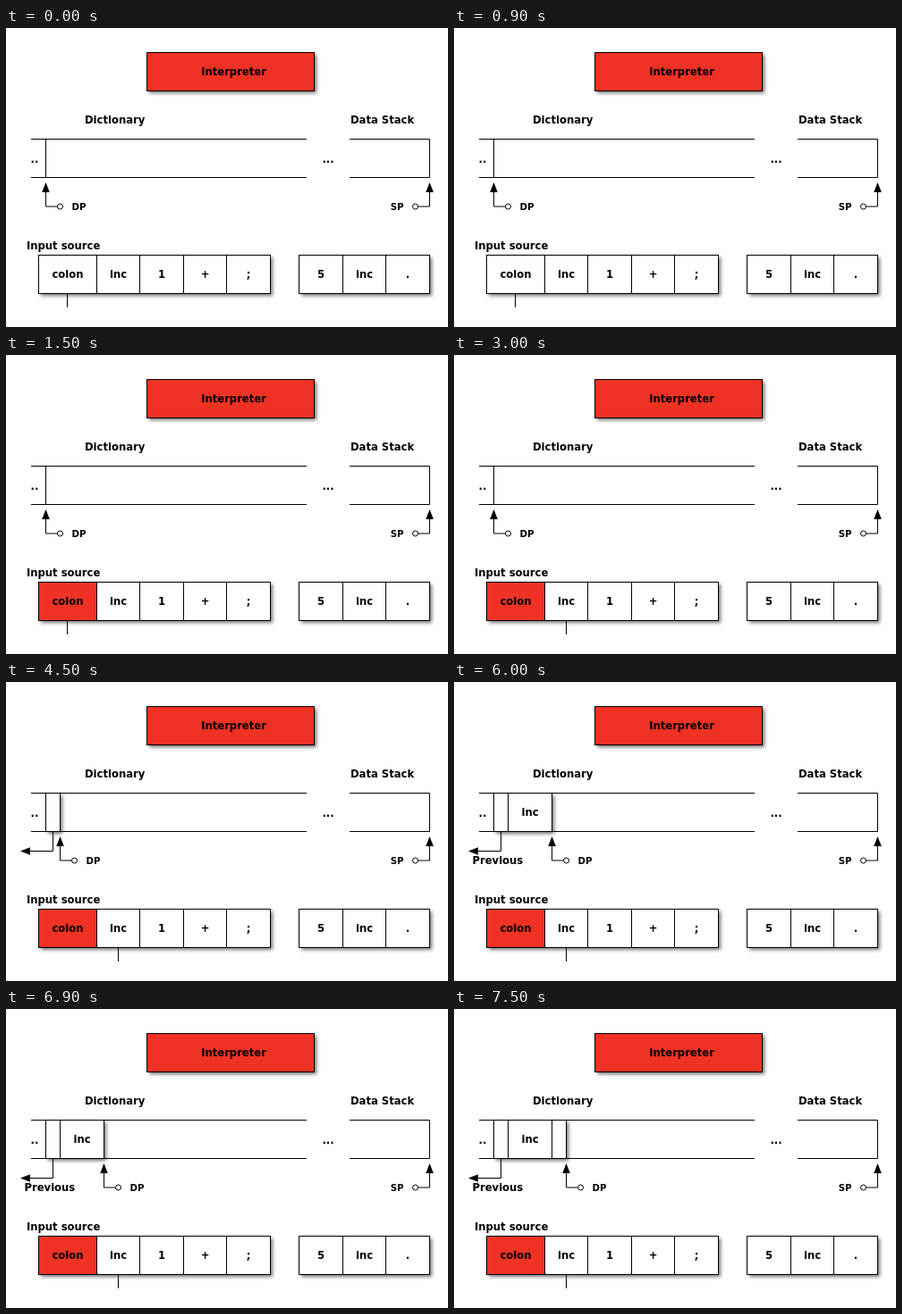
These frames come from a looping animation (494 px wide and 335 px high, 8000 ms). An HTML page with a canvas:

```html
<!DOCTYPE html>
<html>
<head>
<meta charset="utf-8">
<style>
html, body { margin: 0; width: 100%; height: 100%; overflow: hidden; background: #fff; }
canvas { display: block; width: 494px; height: 335px; }
</style>
</head>
<body>
<canvas id="stage"></canvas>
<script>
const W = 494, H = 335, LOOP = 8000, STEP = 1500;
const RED = '#f03224', INK = '#000';
const TOP = 124.5, BOTTOM = 167.5;
const canvas = document.getElementById('stage');
const ctx = canvas.getContext('2d');
const dpr = window.devicePixelRatio || 1;
canvas.width = W * dpr;
canvas.height = H * dpr;

function line(...pts) {
  ctx.beginPath();
  for (let i = 0; i < pts.length; i += 2) ctx.lineTo(pts[i], pts[i + 1]);
  ctx.stroke();
}

function label(str, x, y, align = 'left', size = 11.6) {
  ctx.font = `bold ${size}px "DejaVu Sans", sans-serif`;
  ctx.textAlign = align;
  ctx.fillStyle = INK;
  ctx.fillText(str, x, y);
}

function box(x, y, right, bottom, fill = '#fff') {
  ctx.save();
  ctx.shadowColor = 'rgba(0,0,0,0.55)';
  ctx.shadowBlur = 4 * dpr;
  ctx.shadowOffsetX = ctx.shadowOffsetY = 2 * dpr;
  ctx.fillStyle = fill;
  ctx.fillRect(x, y, right - x, bottom - y);
  ctx.restore();
  ctx.strokeRect(x, y, right - x, bottom - y);
}

// A row of joined cells; edges has one more entry than words.
function cells(edges, words, y, bottom, firstFill) {
  box(edges[0], y, edges[edges.length - 1], bottom);
  if (firstFill) {
    ctx.fillStyle = firstFill;
    ctx.fillRect(edges[0], y, edges[1] - edges[0], bottom - y);
    ctx.strokeRect(edges[0], y, edges[1] - edges[0], bottom - y);
  }
  words.forEach((word, i) => {
    if (i) line(edges[i], y, edges[i], bottom);
    label(word, (edges[i] + edges[i + 1]) / 2, y + 25.5, 'center');
  });
}

function arrowHead(x, y, dx, dy) {
  const bx = x - dx * 11, by = y - dy * 11;
  ctx.beginPath();
  ctx.moveTo(x, y);
  ctx.lineTo(bx + dy * 4.3, by + dx * 4.3);
  ctx.lineTo(bx - dy * 4.3, by - dx * 4.3);
  ctx.fillStyle = INK;
  ctx.fill();
}

// Upward pointer whose knob sits to one side (1 right, -1 left).
function pointer(x, side, name) {
  const knob = x + side * 16;
  line(x, 180, x, 200, knob - side * 3, 200);
  arrowHead(x, 173, 0, -1);
  ctx.beginPath();
  ctx.arc(knob, 200, 3, 0, Math.PI * 2);
  ctx.stroke();
  label(name, x + side * 29, 203.6, side > 0 ? 'left' : 'right', 10.2);
}

function dictionary(step) {
  line(28, TOP, 336, TOP);
  line(28, BOTTOM, 336, BOTTOM);
  label('..', 27.5, 150.5);
  const edges = [44.5, 60.5, 109.5, 125.5].slice(0, Math.max(1, step - 1));
  if (edges.length > 1) {
    cells(edges, ['', 'inc', ''].slice(0, edges.length - 1), TOP, BOTTOM);
    line(52.5, BOTTOM, 52.5, 189.5, 25, 189.5);
    arrowHead(16, 189.5, -1, 0);
  } else {
    line(44.5, TOP, 44.5, BOTTOM);
  }
  if (step > 3) label('Previous', 20.5, 204);
  pointer(edges[edges.length - 1], 1, 'DP');
}

function draw(step) {
  ctx.setTransform(dpr, 0, 0, dpr, 0, 0);
  ctx.fillStyle = '#fff';
  ctx.fillRect(0, 0, W, H);
  ctx.strokeStyle = INK;
  ctx.lineWidth = 1;

  box(157.5, 27.5, 344.5, 70.5, RED);
  label('Interpreter', 254.5, 53, 'center');
  label('Dictionary', 88, 107);
  label('Data Stack', 385, 107);
  label('Input source', 23, 247.5);

  dictionary(step);
  label('...', 360, 150.5, 'center');
  line(384, TOP, 473.5, TOP, 473.5, BOTTOM, 384, BOTTOM);
  pointer(473.5, -1, 'SP');

  cells([36.5, 101.5, 149.5, 198.5, 246.5, 295.5], ['colon', 'inc', '1', '+', ';'],
    254.5, 297.5, step > 0 ? RED : null);
  cells([327.5, 376.5, 424.5, 473.5], ['5', 'inc', '.'], 254.5, 297.5);
  const mark = step < 2 ? 68.5 : 125.5;
  line(mark, 297.5, mark, 313);
}

const start = performance.now();
function tick() {
  draw(Math.floor((performance.now() - start) % LOOP / STEP));
  requestAnimationFrame(tick);
}
tick();
</script>
</body>
</html>
```
